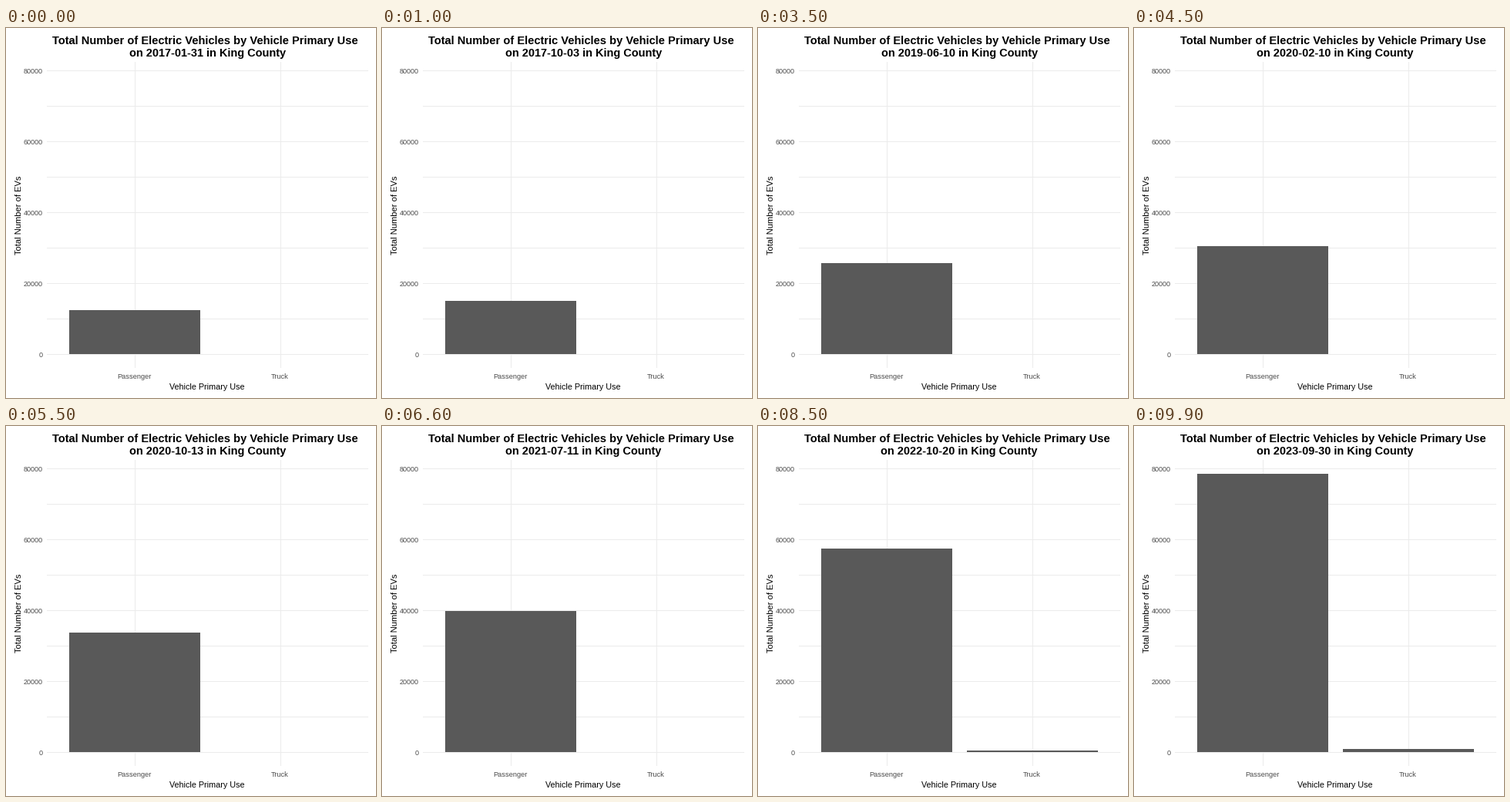
Recreate the animation shown at these times as a matplotlib script. Size 480 px wide and 480 px high, loop 10 s.

```python
import numpy as np
import matplotlib.pyplot as plt
from matplotlib.animation import FuncAnimation
from matplotlib.patches import Rectangle

SIZE, FRAMES, INTERVAL = 480, 100, 100
LAST = FRAMES - 1
LEFT, RIGHT, TOP, BOTTOM = 53, 470, 44, 441
ZERO, PX_PER_EV = 423, 0.0046
GRID, BAR, TICK = "#EBEBEB", "#595959", "#4D4D4D"

START = np.datetime64("2017-01-31")
DAYS = int((np.datetime64("2023-09-30") - START).astype(int))

# Passenger fleet at a few steps; it grows exponentially in between
FLEET = {0: 12400, 20: 18300, 35: 25700, 44: 30200,
         55: 33700, 66: 39800, 85: 57400, LAST: 78500}
TRUCK_START, TRUCK_END = 76, 870

plt.rcParams["font.family"] = "Liberation Sans"

fig = plt.figure(figsize=(SIZE / 72, SIZE / 72), dpi=72, facecolor="white")
ax = fig.add_axes([0, 0, 1, 1])
ax.set(xlim=(0, SIZE), ylim=(SIZE, 0))
ax.axis("off")


def box(x, y, w, h, color, z=1):
    return ax.add_patch(Rectangle((x, y), w, h, fc=color, lw=0,
                                  antialiased=False, zorder=z))


def label(x, y, text, size, color="black", ha="center", **kw):
    return ax.text(x, y, text, size=size, color=color, ha=ha,
                   va="baseline", **kw)


def passengers(i):
    return np.exp(np.interp(i, list(FLEET), np.log(list(FLEET.values()))))


def trucks(i):
    return TRUCK_END * max(0, i - TRUCK_START) / (LAST - TRUCK_START)


for value in range(0, 80001, 10000):
    y = round(ZERO - value * PX_PER_EV)
    box(LEFT, y, RIGHT - LEFT, 1, GRID)
    if value % 20000 == 0:
        label(48, y + 4, str(value), 9, TICK, ha="right")

bars = []
for x, name, count in ((167, "Passenger", passengers), (356, "Truck", trucks)):
    box(x, TOP, 1, BOTTOM - TOP, GRID)
    label(x - 0.5, 455, name, 9.2, TICK)
    bars.append((box(x - 85, ZERO, 170, 0, BAR, 2), count))

label(260.5, 469, "Vehicle Primary Use", 10.8)
label(20, 242.5, "Total Number of EVs", 11.1, rotation=90,
      rotation_mode="anchor")
label(258.8, 21, "Total Number of Electric Vehicles by Vehicle Primary Use",
      14.6, weight="bold")
subtitle = label(261.2, 37, "", 14.5, weight="bold")


def update(i):
    day = START + DAYS * i // LAST
    subtitle.set_text(f"on {day} in King County")
    for bar, count in bars:
        height = round(count(i) * PX_PER_EV)
        bar.set_y(ZERO - height)
        bar.set_height(height)
    return [subtitle] + [bar for bar, _ in bars]


anim = FuncAnimation(fig, update, frames=FRAMES, interval=INTERVAL,
                     repeat=True, repeat_delay=0)
plt.show()
```
